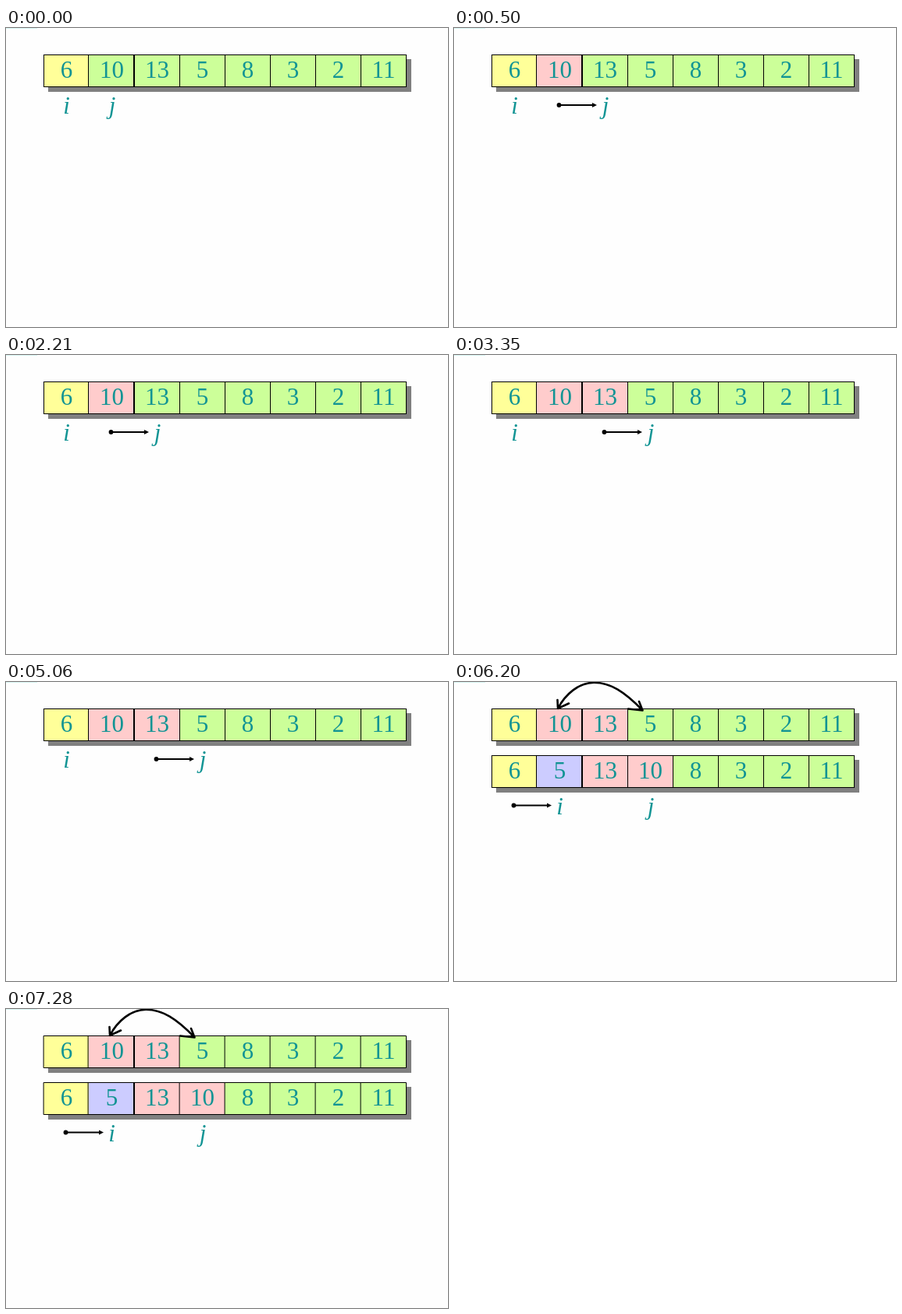
Recreate the animation shown at these times as an HTML page with a canvas. Size 566x384 px, loop 8 s.

```html
<!DOCTYPE html>
<html>
<head>
<meta charset="utf-8">
<style>
html, body { margin: 0; width: 100%; height: 100%; overflow: hidden; background: #fefefe; }
canvas { display: block; }
</style>
</head>
<body>
<canvas id="stage" width="566" height="384"></canvas>
<script>
const ctx = document.getElementById('stage').getContext('2d');
const LEFT = 48, CELL = 58, HEIGHT = 41;
const COLORS = { y: '#ffff99', g: '#ccff99', p: '#ffcccc', b: '#ccccff' };
const INK = '#129494';
const center = col => LEFT + CELL * col + 29.5;

function label(text, x, y, style = '') {
  ctx.font = style + ' 31px "Liberation Serif", "Times New Roman", serif';
  ctx.textAlign = 'center';
  ctx.fillStyle = INK;
  ctx.fillText(text, x, y);
}

function row(top, values, colors) {
  ctx.fillStyle = '#808080';
  ctx.fillRect(LEFT + 6, top + 6, CELL * 8 + 1, HEIGHT + 1);
  ctx.strokeStyle = '#000';
  ctx.lineWidth = 1;
  values.forEach((value, col) => {
    const x = LEFT + CELL * col;
    ctx.fillStyle = COLORS[colors[col]];
    ctx.fillRect(x, top, CELL, HEIGHT);
    // the first divider sits one pixel left
    ctx.strokeRect(x + (col === 1 ? -0.5 : 0.5), top + 0.5, col === 1 ? CELL + 1 : CELL, HEIGHT);
    label(value, center(col), top + 30);
  });
  ctx.fillStyle = '#000';
  ctx.fillRect(LEFT + CELL * 2 - 1, top, 2, HEIGHT);
  // cover the doubled edge left of the second cell
  ctx.fillStyle = COLORS[colors[1]];
  ctx.fillRect(LEFT + CELL, top + 1, 1, HEIGHT - 1);
}

const pointer = (name, col, top) =>
  label(name, center(col) + (name === 'j' ? 0.5 : 0), top + 76, 'italic');

function stepArrow(col, top) {
  const x = LEFT + CELL * col + 29, y = top + 65;
  ctx.fillStyle = '#000';
  ctx.beginPath();
  ctx.arc(x - 0.5, y, 2.9, 0, Math.PI * 2);
  ctx.fill();
  ctx.fillRect(x, y - 1, 43, 2);
  ctx.beginPath();
  ctx.moveTo(x + 42, y - 3);
  ctx.lineTo(x + 48, y);
  ctx.lineTo(x + 42, y + 3);
  ctx.fill();
}

function swapArrow() {
  ctx.strokeStyle = '#000';
  ctx.lineWidth = 2.6;
  ctx.lineCap = ctx.lineJoin = 'round';
  ctx.stroke(new Path2D(
    'M133 34C143 15 160 1 179 0.8C200 0.5 219 13 241 36' +
    'M132.5 23L133 34L147 27.5M237 25L241.5 36.5L223 34.5'));
}

function draw(time) {
  const first = [6, 10, 13, 5, 8, 3, 2, 11];
  ctx.fillStyle = '#fefefe';
  ctx.fillRect(0, 0, 566, 384);
  ctx.fillStyle = '#d8f5f3';
  ctx.fillRect(0, 0, 40, 1);

  const step = time < 500 ? 0 : time < 3350 ? 1 : 2;
  row(34, first, 'y' + 'p'.repeat(step) + 'g'.repeat(7 - step));
  if (time < 6200) {
    pointer('i', 0, 34);
    pointer('j', step + 1, 34);
    if (step) stepArrow(step, 34);
  } else {
    row(94, [6, 5, 13, 10, 8, 3, 2, 11], 'ybppgggg');
    pointer('i', 1, 94);
    pointer('j', 3, 94);
    stepArrow(0, 93.5);
    swapArrow();
  }
}

function tick() {
  draw(performance.now() % 8000);
  requestAnimationFrame(tick);
}
tick();
</script>
</body>
</html>
```
